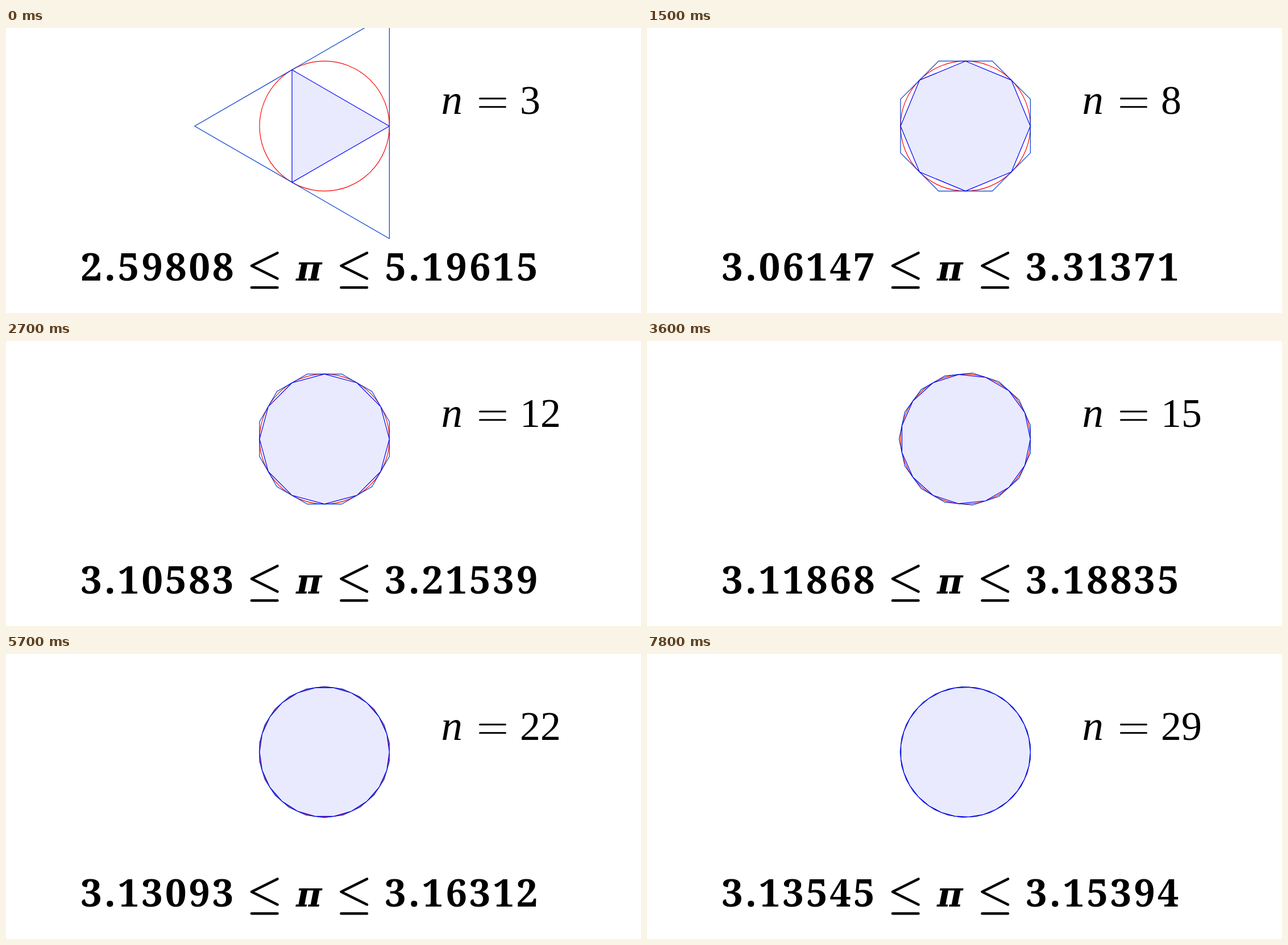
An HTML page that plays this animation: 1117x501 px, repeating every 8000 ms.

```html
<!DOCTYPE html>
<html lang="en">
<head>
<meta charset="utf-8">
<title>Polygon bounds for pi</title>
<style>
  html, body { margin: 0; width: 100%; height: 100%; overflow: hidden; background: #fff; }
  svg { display: block; width: 100vw; height: 100vh; }
  .shapes { fill: none; stroke-width: 1.2; stroke-linejoin: round; }
  .circle { stroke: #f00; }
  .outer { stroke: #0038d0; }
  .inner { stroke: #00f; fill: #e9eafd; }
  .signs { fill: none; stroke: #000; stroke-width: 4.6; stroke-linecap: round; stroke-linejoin: round; }
  .equals { stroke-width: 3; }
  .count { font: 72px "Liberation Serif", serif; }
  .var { font-style: italic; font-size: 75px; }
  .bound { font: bold 67px "Noto Serif", serif; letter-spacing: 4.1px; }
  .pi { font: italic bold 62px "DejaVu Serif", serif; }
</style>
</head>
<body>
<svg viewBox="0 0 1117 501">
  <defs>
    <path id="leq" d="M47.5 395.5L2 418L47.5 440.5M2 456.3H47.5"/>
  </defs>
  <g class="shapes">
    <circle class="circle" cx="560.2" cy="172.4" r="114.2"/>
    <polygon class="outer" id="outer"/>
    <polygon class="inner" id="inner"/>
  </g>
  <g class="signs">
    <path class="equals" d="M833.5 124H878.5M833.5 138.8H878.5"/>
    <use href="#leq" x="430"/>
    <use href="#leq" x="587.5"/>
  </g>
  <text class="count var" x="765.5" y="151">n</text>
  <text class="count" id="count" x="904" y="151"></text>
  <text class="bound" id="low" x="131.5" y="444"></text>
  <text class="pi" x="533" y="444" text-anchor="middle">π</text>
  <text class="bound" id="high" x="666.5" y="444"></text>
</svg>
<script>
  const LOOP = 8000, STEP = 300, FIRST = 3;
  const CX = 560.2, CY = 172.4, R = 114.2;
  const el = id => document.getElementById(id);

  function polygon(n, radius, turn) {
    return Array.from({ length: n }, (_, k) => {
      const a = 2 * Math.PI * k / n + turn;
      return (CX + radius * Math.cos(a)).toFixed(2) + "," + (CY - radius * Math.sin(a)).toFixed(2);
    }).join(" ");
  }

  function draw(n) {
    const half = Math.PI / n;
    el("inner").setAttribute("points", polygon(n, R, 0));
    el("outer").setAttribute("points", polygon(n, R / Math.cos(half), half));
    el("count").textContent = n;
    el("low").textContent = (n * Math.sin(half)).toFixed(5);
    el("high").textContent = (n * Math.tan(half)).toFixed(5);
  }

  let shown = 0;
  function tick() {
    const n = FIRST + Math.floor(performance.now() % LOOP / STEP);
    if (n !== shown) draw(shown = n);
    requestAnimationFrame(tick);
  }
  tick();
</script>
</body>
</html>
```
